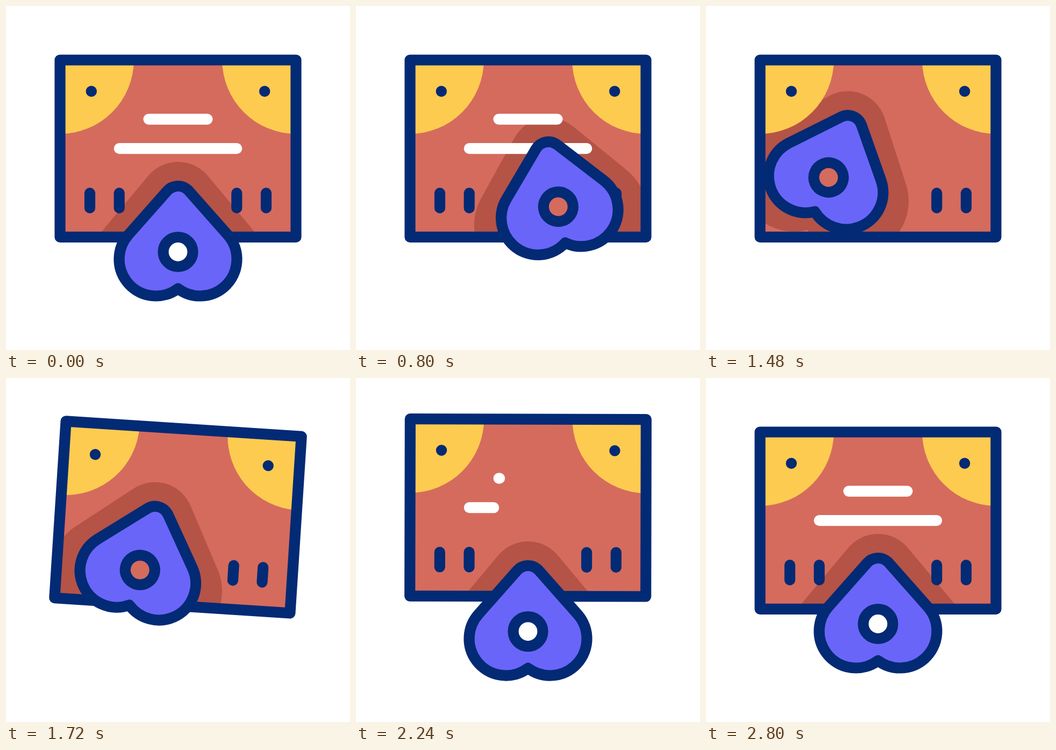
An HTML page with a canvas that plays this animation: 640x640 px, repeating every 3 s.

```html
<!DOCTYPE html>
<html lang="en">
<head>
<meta charset="utf-8">
<title>Spirit board</title>
<style>
html, body { margin: 0; width: 100%; height: 100%; overflow: hidden; background: #fff; }
canvas { display: block; width: 100vw; height: 100vh; }
</style>
</head>
<body>
<canvas id="stage" width="640" height="640"></canvas>
<script>
const ctx = document.getElementById('stage').getContext('2d');
const LOOP = 3000;
const NAVY = '#032a74', RED = '#d56b5d', SHADE = '#b55347';
const YELLOW = '#fdcb50', PURPLE = '#6a65f9', WHITE = '#fff';
const TAU = Math.PI * 2;
const W = 219.5, H = 164.7; // half size of the board

// Eased progress from 0 to 1, beginning at a time and lasting a while.
function span(t, begin, length) {
  const p = Math.min(1, Math.max(0, (t - begin) / length));
  return (1 - Math.cos(Math.PI * p)) / 2;
}

// The pointer dips, glides up right, sweeps left, then drops back to rest.
function pointerPose(t) {
  const dip = span(t, 200, 235) - span(t, 2128, 235);
  const glide = span(t, 430, 605);
  const sweep = span(t, 1087, 393);
  const back = span(t, 1530, 598);
  return {
    x: 320 + 83.5 * glide - 175.5 * sweep + 92 * back,
    y: 457.5 + 26.5 * dip - 164 * (glide - back) - sweep + back,
    deg: -16.3 * glide + 38.3 * sweep - 22 * back
  };
}

// The board hops while it rocks to both sides.
function boardPose(t) {
  const beat = 375, first = 1675;
  const turn = i => span(t, first + i * beat, beat);
  return {
    x: 320,
    y: 265.2 - 25 * (span(t, 1505, 650) - span(t, 2190, 370)),
    deg: 4 * (span(t, first - beat / 2, beat / 2) - 2 * turn(0) + 2 * turn(1) - turn(2))
  };
}

function place({ x, y, deg }) {
  ctx.translate(x, y);
  ctx.rotate(deg * Math.PI / 180);
}

function disc(x, y, r, color) {
  ctx.fillStyle = color;
  ctx.beginPath();
  ctx.arc(x, y, r, 0, TAU);
  ctx.fill();
}

function bar(x1, y1, x2, y2, color) {
  ctx.strokeStyle = color;
  ctx.beginPath();
  ctx.moveTo(x1, y1);
  ctx.lineTo(x2, y2);
  ctx.stroke();
}

// Upside-down heart: two lobes joined by tangents to a round tip.
function heart(cx, cy, r, tipR) {
  const tipY = -95.5, dy = tipY - cy;
  const a = Math.atan2(dy, cx) - Math.acos((r - tipR) / Math.hypot(cx, dy));
  const notch = Math.acos(-cx / r);
  const path = new Path2D();
  path.arc(0, tipY, tipR, a, -Math.PI - a);
  path.arc(cx, cy, r, -Math.PI - a, notch);
  path.arc(-cx, cy, r, Math.PI - notch, a + TAU);
  path.closePath();
  return path;
}

const ring = new Path2D();
ring.arc(0, 0, 27.5, 0, TAU);

function withHole(path) {
  const p = new Path2D(path);
  p.addPath(ring);
  return p;
}

const outline = heart(41, 13.5, 68.5, 27);
const body = withHole(outline);
const shadow = withHole(heart(60, 23, 102, 72));

// A line of writing is wiped by the sweep and written again later.
function writing(t, half, y, again) {
  const part = 1 - span(t, 1087, 393) + span(t, again, 395);
  if (part > 0) bar(-half, y, half * (2 * part - 1), y, WHITE);
}

function drawBoard(t, pointer) {
  const board = boardPose(t);

  ctx.save();
  place(board);
  ctx.beginPath();
  ctx.rect(-W, -H, 2 * W, 2 * H);
  ctx.fillStyle = RED;
  ctx.fill();
  ctx.clip();

  // The shadow follows the pointer but stays within the board.
  ctx.save();
  ctx.resetTransform();
  place(pointer);
  ctx.fillStyle = SHADE;
  ctx.fill(shadow, 'evenodd');
  ctx.restore();

  for (const s of [-1, 1]) disc(s * W, -H, 137.3, YELLOW);
  ctx.restore();

  ctx.save();
  place(board);
  ctx.strokeStyle = NAVY;
  ctx.strokeRect(-W, -H, 2 * W, 2 * H);
  for (const s of [-1, 1]) {
    disc(s * 161.2, -106.5, 10.2, NAVY);
    for (const x of [109.3, 164]) bar(s * x, 83, s * x, 110.5, NAVY);
  }
  writing(t, 54.5, -54.6, 2212);
  writing(t, 109.2, 0, 2122);
  ctx.restore();
}

function drawPointer(pose) {
  ctx.save();
  place(pose);
  ctx.fillStyle = PURPLE;
  ctx.fill(body, 'evenodd');
  ctx.strokeStyle = NAVY;
  ctx.stroke(outline);
  ctx.stroke(ring);
  ctx.restore();
}

function draw(t) {
  ctx.fillStyle = WHITE;
  ctx.fillRect(0, 0, 640, 640);
  ctx.lineWidth = 20.2;
  ctx.lineCap = ctx.lineJoin = 'round';
  const pointer = pointerPose(t);
  drawBoard(t, pointer);
  drawPointer(pointer);
}

const start = performance.now();
function tick() {
  draw((performance.now() - start) % LOOP);
  requestAnimationFrame(tick);
}
tick();
</script>
</body>
</html>
```
